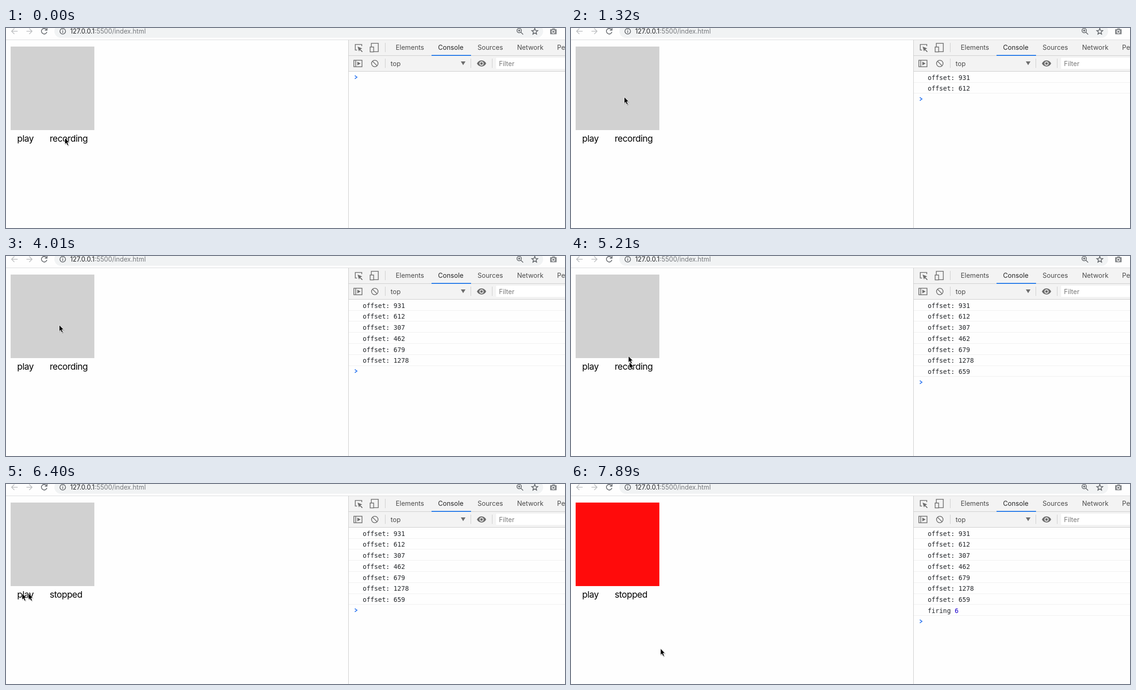
Recreate the animation shown at these times as an HTML page. Size 1202x431 px, loop 8 s.

```html
<!DOCTYPE html>
<html lang="en">
<head>
<meta charset="utf-8">
<title>Recorder</title>
<style>
html, body { margin: 0; width: 100%; height: 100%; overflow: hidden; background: #fff; }
svg { display: block; width: 100vw; height: 100vh; }
text { white-space: pre; }
.page { font: 19px Inter, sans-serif; letter-spacing: -.48px; fill: #000; }
.url { font: 13.8px Inter, sans-serif; fill: #74777b; }
.tool { font: 14.1px Inter, sans-serif; fill: #4a4a4a; }
.log { font: 13.75px "DejaVu Sans Mono", monospace; fill: #222529; }
.line { fill: none; stroke: #6e6e6e; stroke-width: 1.6; }
.bar { stroke: #5f6368; }
</style>
</head>
<body>
<svg viewBox="0 0 1202 431">
  <defs>
    <g id="cursor">
      <path d="M1 2V16.5L4.3 13.4L6.9 19L10 17.6L7.5 12.2H12Z" fill="#000" opacity=".14"/>
      <path d="M.4 .6V14.6L3.5 11.7L5.8 17L8.4 15.9L6.1 10.7H10.2Z" fill="#000" stroke="#fff" stroke-width=".9"/>
    </g>
  </defs>
  <rect width="1202" height="431" fill="#fefefe"/>

  <!-- address bar -->
  <rect x="104" y="-7" width="1051" height="28" rx="14" fill="#f1f3f4"/>
  <rect y="25" width="1202" height="1" fill="#d9dadb"/>
  <g class="line bar">
    <path d="M25 7H12M18 1L12 7L18 13M44 7H56M50 1L56 7L50 13" stroke="#bdbfc1"/>
    <path d="M87 3.2A6 6 0 1 0 88 8.6M88.3 0V4.6H83.5"/>
    <circle cx="122" cy="7" r="6"/>
    <path d="M122 6.2V10.4M122 3.4V5"/>
    <circle cx="1103.5" cy="5.5" r="4.7"/>
    <path d="M1107 9L1112 14M1101 5.5H1106M1103.5 3V8"/>
    <path d="M1137 .8L1138.8 5.2L1143.5 5.6L1139.9 8.6L1141 13.2L1137 10.7L1133 13.2L1134.1 8.6L1130.5 5.6L1135.2 5.2Z"/>
  </g>
  <path d="M1171.5 2.5H1174L1175 1H1180L1181 2.5H1183Q1184 2.5 1184 3.5V12.5Q1184 13.5 1183 13.5H1171.5Q1170 13.5 1170 12.5V3.5Q1170 2.5 1171.5 2.5Z" fill="#85888b"/>
  <circle cx="1177" cy="8" r="3" fill="#85888b" stroke="#fff" stroke-width="1.3"/>
  <text class="url" x="138" y="12"><tspan fill="#202124">127.0.0.1</tspan>:5500/index.html</text>

  <!-- page -->
  <rect id="pad" x="10" y="40" width="180" height="180"/>
  <text class="page" x="24" y="245">play</text>
  <text class="page" id="mode" x="94" y="245"></text>

  <!-- inspector -->
  <rect x="736" y="26" width="466" height="67" fill="#f3f3f3"/>
  <path d="M736.5 26V431M737 59.5H1202M737 93.5H1202M815.5 32V52M815.5 66V86M999.5 66V86M1045.5 66V86" fill="none" stroke="#cbcbcb"/>
  <rect x="915" y="58" width="85" height="2" fill="#1a73e8"/>
  <rect x="1054" y="64" width="148" height="24" fill="#fff"/>
  <g class="line">
    <path d="M755 47.5H751V35.5H765V39"/>
    <path d="M785.5 41V33H800.5V51H791"/>
    <rect x="783" y="41" width="7.5" height="10.5"/>
    <rect x="748" y="69.5" width="17.5" height="14"/>
    <path d="M752 69.5V83.5"/>
    <circle cx="793" cy="76.5" r="7"/>
    <path d="M788 71.5L798 81.5"/>
  </g>
  <g fill="#6e6e6e">
    <path d="M756 40L766 44L762 45.8L767 50.8L765.5 52L760.8 47.3L759 50.5Z"/>
    <path d="M755.5 72.5L762.5 76.5L755.5 80.5Z"/>
    <path d="M978 72H988L983 80Z"/>
    <path d="M1012.5 76.5Q1016 69.8 1022.5 69.8Q1029 69.8 1032.5 76.5Q1029 83 1022.5 83Q1016 83 1012.5 76.5Z"/>
    <circle cx="1022.5" cy="76.5" r="3.6" stroke="#f3f3f3" stroke-width="1.7"/>
  </g>
  <g class="tool">
    <text x="838" y="47">Elements</text>
    <text x="929" y="47" fill="#222">Console</text>
    <text x="1014" y="47">Sources</text>
    <text x="1099" y="47">Network</text>
    <text x="1185" y="47">Performance</text>
    <text x="827" y="82">top</text>
    <text x="1060" y="82" fill="#777">Filter</text>
  </g>
  <g id="rows"></g>
  <path id="prompt" d="M750 102.5L754.7 106L750 109.5" fill="none" stroke="#367cf1" stroke-width="1.8"/>

  <use id="trail" href="#cursor"/>
  <use id="arrow" href="#cursor"/>
</svg>
<script>
const LOOP = 8000, ROW = 23.75;
// The screen refreshes in coarse ticks, and the pointer smears over half of one.
const TICK = 149.2, LEAD = 25, SMEAR = .5;
const STOP = 40, PLAY = 47;
const $ = id => document.getElementById(id);
const ticks = ms => Math.floor(ms / 150);

const offsets = [931, 612, 307, 462, 679, 1278, 659];
let elapsed = 0;
const logs = offsets.map(ms => {
  elapsed += ms;
  return { at: ticks(elapsed) - 1, html: `offset: ${ms}` };
});
const FIRE = PLAY + ticks(offsets[0]);
logs.push({ at: FIRE, html: `firing <tspan fill="#1c00cf">${offsets.length - 1}</tspan>` });

const record = [126, 236], pad = [114, 148], play = [34, 235], rest = [192, 354];
const moves = [
  { from: record, to: pad, at: .15, span: 1.65 },
  { from: pad, to: record, at: 31.9, span: 3.8 },
  { from: record, to: play, at: 41, span: 2 },
  { from: play, to: rest, at: 46.95, span: 2.3 }
];

$('rows').innerHTML = logs.map(({ html }, i) => {
  const edge = Math.floor(93.2 + 23.8 * (i + 1)) + .5;
  return `<g><text class="log" x="767" y="${Math.round(111.7 + ROW * i)}">${html}</text>` +
    `<path d="M737 ${edge}H1202" stroke="#efefef"/></g>`;
}).join('');
const rows = [...$('rows').children];

const ease = p => p * p * (3 - 2 * p);

function pointer(tick) {
  const { from, to, at, span } = moves.filter(m => m.at <= tick).pop() || moves[0];
  const p = ease(Math.min(1, Math.max(0, (tick - at) / span)));
  return from.map((v, i) => Math.round(v + (to[i] - v) * p));
}

function draw(t) {
  const tick = Math.floor((t + LEAD) / TICK);
  const shown = logs.filter(({ at }) => at <= tick).length;
  rows.forEach((row, i) => { row.style.display = i < shown ? '' : 'none'; });
  $('prompt').setAttribute('transform', `translate(0 ${Math.floor(ROW * shown)})`);
  $('mode').textContent = tick < STOP ? 'recording' : 'stopped';
  $('pad').setAttribute('fill', tick < FIRE ? '#d1d1d1' : '#ff0b0b');
  $('arrow').setAttribute('transform', `translate(${pointer(tick)})`);
  $('trail').setAttribute('transform', `translate(${pointer(tick - SMEAR)})`);
}

const start = performance.now();
function frame() {
  draw((performance.now() - start) % LOOP);
  requestAnimationFrame(frame);
}
draw(0);
requestAnimationFrame(frame);
</script>
</body>
</html>
```
